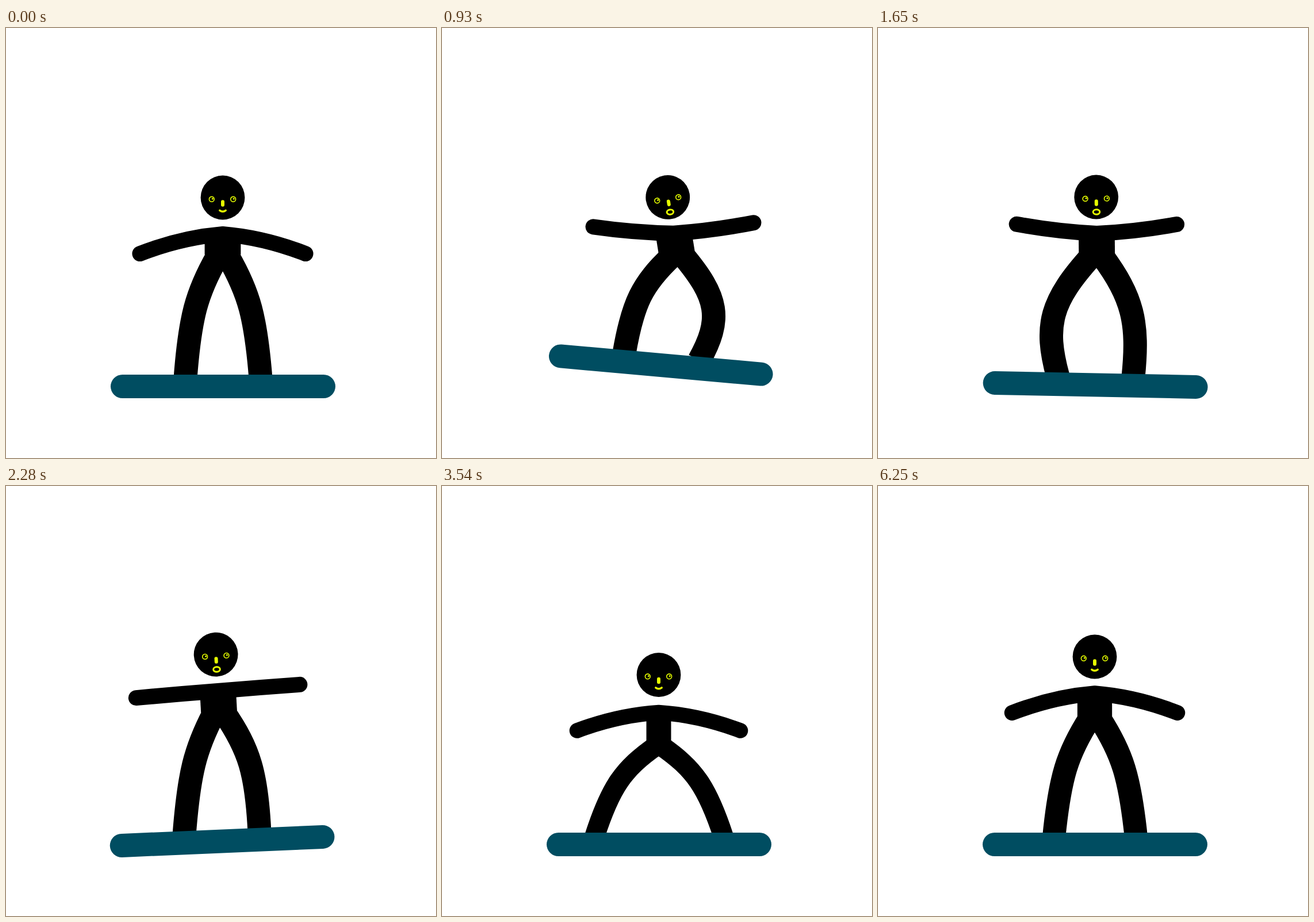
An HTML page that plays this animation: 748 px wide and 748 px high, repeating every 6280 ms.

```html
<!DOCTYPE html>
<html lang="en">
<head>
<meta charset="utf-8">
<title>Balance board</title>
<style>
  html, body { margin: 0; width: 100%; height: 100%; overflow: hidden; background: #fff; }
  svg { display: block; width: 100%; height: 100%; }
</style>
</head>
<body>
<svg viewBox="0 0 748 748">
  <g fill="none" stroke="#000">
    <path id="legL"/>
    <path id="legR"/>
    <path id="arms" stroke-linecap="round" stroke-linejoin="round"/>
  </g>
  <path id="torso"/>
  <g id="head">
    <circle r="38.4"/>
    <g fill="none" stroke="#e6ff00" stroke-linecap="round">
      <circle cx="-19.2" cy="2.8" r="4.4" stroke-width="1.6"/>
      <circle cx="18.2" cy="2.8" r="4.4" stroke-width="1.6"/>
      <path d="M-17.7 2.1h.01M19.2 2.1h.01" stroke-width="3"/>
      <path d="M0 7.2v5.6" stroke-width="6"/>
      <path id="smile" d="M-5.2 22.3Q0 26.3 5.2 22.3" stroke-width="3.4"/>
      <ellipse id="gasp" cy="26" rx="5.8" ry="4.2" stroke-width="3"/>
    </g>
  </g>
  <path id="board" d="M-175 0H175" stroke="#004d61" stroke-width="41" stroke-linecap="round"/>
</svg>
<script>
const LOOP = 6280, STEP = 30, CROUCHED = 3540, RISE = 6070, SHIFT = 240;
const { PI, sin, cos, exp, tanh, abs, sign, hypot, min, max } = Math;
const el = id => document.getElementById(id);
const rad = deg => deg * PI / 180;
const lerp = (a, b, k) => a + (b - a) * k;
const mix = (a, b, k) => a.map((v, i) => lerp(v, b[i], k));
const clamp = v => max(0, min(1, v));
const smooth = u => u * u * (3 - 2 * u);
const bell = u => exp(-u * u);

// Turn a local point by an angle and move it to an origin
function place(ox, oy, deg, x, y) {
  const c = cos(rad(deg)), s = sin(rad(deg));
  return [ox + x * c - y * s, oy + x * s + y * c];
}

// A sway that quickens while it dies away; s in seconds
function wobble(s) {
  const phase = 0.65 * s + 0.35 * s * s;
  const calm = smooth(clamp((CROUCHED - SHIFT - s * 1000) / 600));
  const hopTime = (s - 1.07) / 0.14;
  const sway = calm * 136 * exp(-0.26 * phase ** 2) * sin(PI * phase);
  const tilt = calm * (50 * exp(-0.45 * phase ** 2) * sin(1.11 * PI * phase) - 23 * phase * exp(-phase));
  return {
    sway, tilt,
    turn: calm * 41 * exp(-0.81 * phase) * sin(PI * phase * 1.01),
    pivot: 130 + 45 * bell(phase),
    hop: -39 * hopTime * exp(-hopTime * hopTime / 2),
    raise: calm * 40 * phase * exp(-0.7 * phase),
    slant: 22 * tanh((tilt + sway / 4) / 22),
    flail: 40 * bell((s - 1.3) / 0.17),
    bend: 40 * bell((s - 1.3) / 0.55) * clamp(s),
    skew: calm * 80 * s * exp(-1.65 * s) * cos(2 * PI * (s - 0.93) / 1.35)
  };
}

// Leg bowed outwards; a stronger bend sits lower
function drawLeg(id, side, hip, foot, bend, width) {
  const [dx, dy] = [foot[0] - hip[0], foot[1] - hip[1]];
  const k = 0.31 + 0.004 * bend, out = side * bend / hypot(dx, dy);
  const knee = [hip[0] + dx * k + dy * out, hip[1] + dy * k - dx * out];
  el(id).setAttribute("d", `M${hip}C${mix(hip, knee, 0.8)} ${mix(foot, knee, 0.8)} ${foot}`);
  el(id).setAttribute("stroke-width", width);
}

function draw(t) {
  const low = t < CROUCHED
    ? clamp((t - CROUCHED + SHIFT) / SHIFT)
    : clamp(1 - (t - RISE + STEP) / SHIFT);
  const w = wobble(t < CROUCHED ? t / 1000 : 0);

  // The board tips over a point near its lower end
  const edge = sign(w.turn) * w.pivot, rise = w.pivot * abs(sin(rad(w.turn)));
  const bx = 377.5 + edge * (1 - cos(rad(w.turn))) + 30 * sin(rad(w.turn));
  const by = 623.5 - rise - w.hop;
  const deck = x => place(bx, by, w.turn, x, -14);

  const hx = 377 + w.sway;
  const hy = lerp(394, 448, low) + 60 * (w.sway / 130) ** 2 - 0.4 * rise;
  const body = (x, y) => place(hx, hy, w.tilt, x, y);
  const spine = lerp(35.5, 54, low) + (low < 1 ? 26 * (1 - low) ** 3 * low : 0);
  const half = lerp(31.4, 21.5, low);
  const neck = body(0, -spine);

  const joint = lerp(9, 3, low), foot = lerp(65.5, 112, low);
  const width = lerp(41, 35, low), bend = lerp(24, 32, low) + w.bend;
  drawLeg("legL", -1, body(-joint, 3), deck(-foot), bend - w.skew, width);
  drawLeg("legR", 1, body(joint, 3), deck(foot), bend + w.skew, width);

  const droop = lerp(13.3, 12.5, low) - w.raise;
  const length = lerp(148, 145.5, low) - 0.4 * w.raise, bow = 11 - 0.8 * w.raise;
  const hand = (side, drop) => place(...neck, side * drop, side * length, 0);
  const handL = hand(-1, droop - w.slant), handR = hand(1, droop + w.slant - w.flail);
  const elbow = end => {
    const [x, y] = mix(end, neck, 0.5);
    return [x, y - bow];
  };
  el("arms").setAttribute("d", `M${handL}Q${elbow(handL)} ${neck}Q${elbow(handR)} ${handR}`);
  el("arms").setAttribute("stroke-width", lerp(27, 26.5, low));

  const outline = [body(-half, 5 - spine), body(half, 5 - spine), body(half, 0), body(0, 21), body(-half, 0)];
  el("torso").setAttribute("d", `M${outline.join("L")}Z`);

  const top = body(0, -spine - lerp(63.5, 65.5, low));
  el("head").setAttribute("transform", `translate(${top}) rotate(${w.tilt})`);
  el("board").setAttribute("transform", `translate(${bx} ${by}) rotate(${w.turn})`);

  const scared = t > 120 && t < 3240;
  el("smile").style.display = scared ? "none" : "";
  el("gasp").style.display = scared ? "" : "none";
}

// The motion advances in even steps with one long hold
function stepped(t) {
  if (t < CROUCHED) return Math.floor(t / STEP) * STEP;
  if (t < RISE) return CROUCHED;
  return RISE + Math.floor((t - RISE) / STEP) * STEP;
}

const start = performance.now();
function tick() {
  draw(stepped((performance.now() - start) % LOOP));
  requestAnimationFrame(tick);
}
tick();
</script>
</body>
</html>
```
